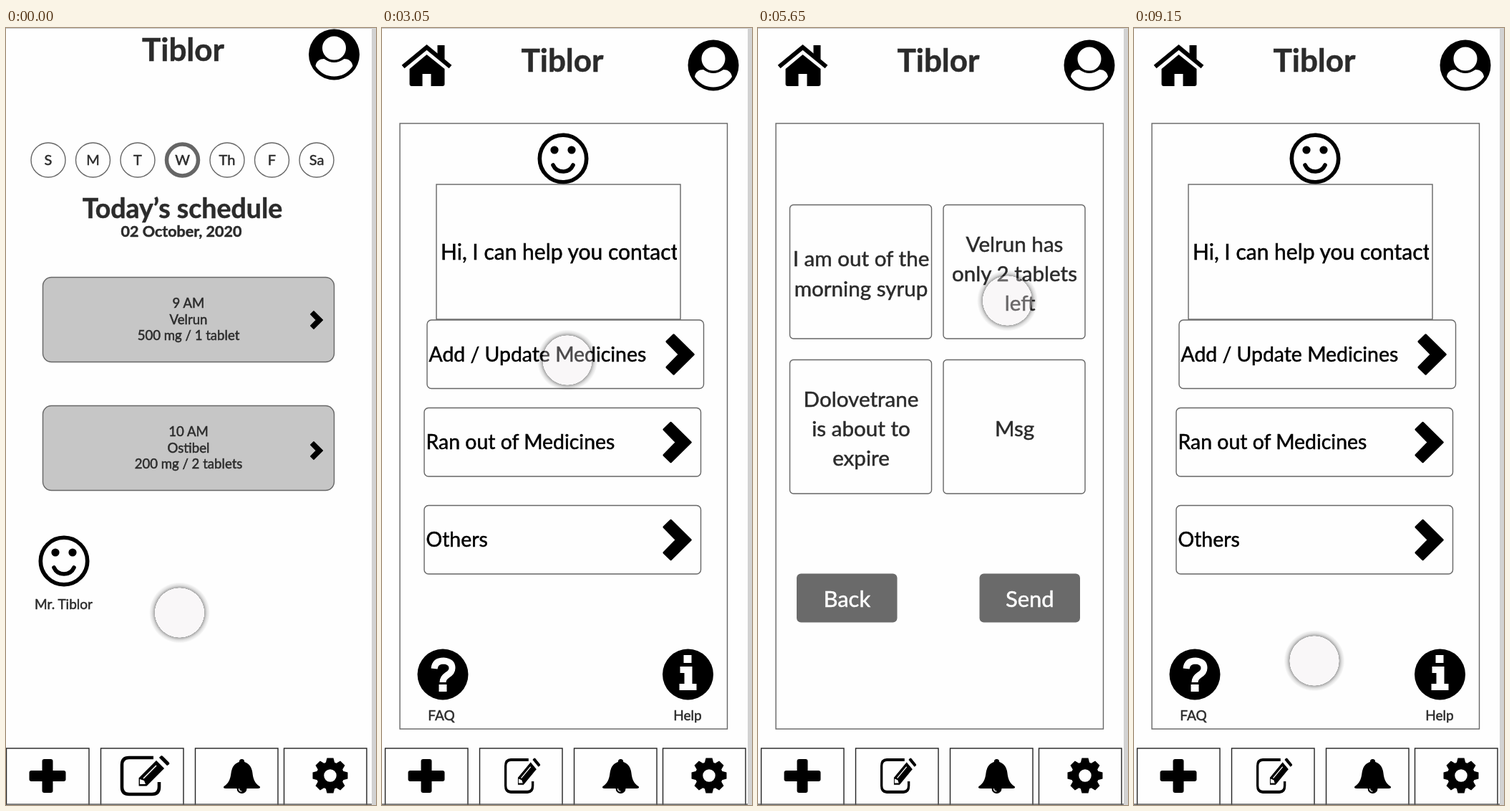
An HTML page that plays this animation: 517x1083 px, repeating every 10000 ms.

```html
<!DOCTYPE html>
<html lang="en">
<head>
<meta charset="utf-8">
<title>Medicine reminder walkthrough</title>
<style>
html, body { margin: 0; width: 100%; height: 100%; overflow: hidden; background: #fefefe; }
svg { display: block; width: 100vw; height: 100vh; }
text { font-family: Lato, "Open Sans", sans-serif; color: #2b2b2b; fill: currentColor; stroke: currentColor; stroke-width: .5; white-space: pre; }
.line { fill: none; stroke: #666; stroke-width: 1.4; }
.ink { fill: none; stroke: #000; }
.paper { fill: #fefefe; }
</style>
</head>
<body>
<svg id="stage" viewBox="0 0 517 1083"></svg>
<script>
const stage = document.getElementById('stage');

const at = (x, y, body, scale = 1) => `<g transform="translate(${x} ${y}) scale(${scale})">${body}</g>`;
const text = (x, y, size, value, attrs = '') =>
  `<text x="${x}" y="${y}" font-size="${size}" text-anchor="middle" ${attrs}>${value}</text>`;
const left = (x, y, size, value, attrs = '') =>
  `<text x="${x}" y="${y}" font-size="${size}" style="color:#000" ${attrs}>${value}</text>`;
const lines = (x, y, step, size, values) => values.map((v, i) => text(x, y + i * step, size, v)).join('');
const box = (x, y, w, h, r = 0, attrs = '') =>
  `<rect class="line" x="${x}" y="${y}" width="${w}" height="${h}" rx="${r}" ${attrs}/>`;
const bold = 'font-weight="700"';

// Icons, each centred on its own origin
const plus = '<rect x="-25.5" y="-7" width="51" height="15" rx="3"/><rect x="-7.5" y="-23" width="15" height="47" rx="3"/>';
const edit = `<path class="ink" stroke-width="4.6" d="M12-25H-22Q-32-25-32-15V16Q-32 26-22 26H10Q20 26 20 16V9"/>
  <path d="M-9 3L16-22 28-10 3 15H-9ZM19-25L22-28Q24-29 26-27L34-19Q36-17 34-15L31-13Z" stroke="#fefefe" stroke-width="1.2"/>
  <path d="M-7 5V12H1L-1 7Z" class="paper"/><path d="M-2 4L16-14" stroke="#fefefe" stroke-width="1.6"/>`;
const bell = `<path d="M-25 15C-14 8-16-3-14-8C-12-16-6-19 0-20C6-19 12-16 14-8C16-3 14 8 25 15Q27 18 22 18H-22Q-27 18-25 15Z"/>
  <circle cy="-19.5" r="3.6"/><circle cy="18" r="7"/><path d="M-4 18Q-4 22 0 22" fill="none" stroke="#fefefe" stroke-width="1.2"/>`;
const tooth = a => `<path d="M-6.5-17L-4.5-24.5H4.5L6.5-17Z" transform="rotate(${a})"/>`;
const gear = '<circle r="14" fill="none" stroke="#000" stroke-width="10.5"/>' +
  [0, 45, 90, 135, 180, 225, 270, 315].map(tooth).join('');
const house = `<path class="ink" stroke-width="6" d="M-33 2L0-25 33 2"/>
  <path d="M15-28H25V-6L15-14ZM-24 5L0-15 25 5V26Q25 29 22 29H6V12H-6V29H-21Q-24 29-24 26Z"/>`;
const profile = `<circle r="35.5"/><path class="paper" d="M-26 16C-25 9-20 6-14 6Q0 16 14 6C20 6 25 9 26 16A30.5 30.5 0 0 1-26 16Z"/>
  <circle class="paper" cy="-9" r="17.5" stroke="#000" stroke-width="2"/>`;
const smiley = `<circle class="ink" r="32.7" stroke-width="5.6"/><circle cx="-12" cy="-12" r="5.6"/><circle cx="12" cy="-12" r="5.6"/>
  <path class="ink" stroke-width="5.6" stroke-linecap="round" d="M-14 9Q-10 18 0 18T14 9"/>`;
const chevron = '<path d="M-8.3-8L-4-12.2 8.4 0-4 12.2-8.3 8-.5 0Z" stroke="#000" stroke-width="1.4" stroke-linejoin="round"/>';
const question = `<circle r="35.5"/><path fill="none" stroke="#fefefe" stroke-width="9" d="M-12-8Q-11-19 1-19Q13-18 13-9Q13-3 6 1Q0 5 0 11"/>
  <rect class="paper" x="-5.5" y="14" width="11" height="10"/>`;
const info = `<circle r="35.5"/><rect class="paper" x="-6" y="-27" width="11" height="11"/>
  <path class="paper" d="M-11-11H6V13H12V22H-12V13H-5V-2H-11Z"/>`;

const nav = (dx, editX, editScale) =>
  [0.5, 132.5, 264.5, 388.5].map(x => box(x + dx, 1004, 115.5, 82, 0, 'style="stroke:#222"')).join('') +
  at(58 + dx, 1042, plus) + at(editX, 1042, edit, editScale) +
  at(329.5 + dx, 1042, bell) + at(453 + dx, 1042, gear);
const header = (x, y) => text(x, y, 44, 'Tiblor', bold) + at(x + 211, y - 9, profile);
const inner = (houseY, body) => header(252, 61) + at(62.5, houseY, house) +
  box(25, 133, 457.5, 844) + body + nav(4, 196, '.73 .88');
const button = (x, y, label) =>
  `<rect x="${x}" y="${y}" width="140.5" height="68" rx="6" fill="#6a6a6a"/>` +
  text(x + 70.3, y + 46.5, 31, label, 'style="color:#fff"');

const day = (name, i) => {
  const x = 59 + i * 62.5, today = i === 3;
  return `<circle class="line" cx="${x}" cy="184" r="${today ? 22 : 24}" ${today ? 'style="stroke-width:5.5"' : ''}/>` +
    text(x, 191, 20, name);
};
const dose = (y, rows) => box(51.5, y, 407, 118, 12, 'style="fill:#c6c6c6"') + lines(255, y + 42.5, 22.6, 18.6, rows);
const option = (x, y, label) => box(x, y, 386.5, 95.5, 6) + left(x + 2.5, y + 57.7, 28.4, label) +
  at(x + 353.5, y + 48, chevron, 2.23);
const message = (x, y, rows, id = '') => box(x, y, 198, 186.5, 5, id) +
  lines(x + 99.5, y + 106.5 - (rows.length - 1) * 20.7, 41.3, 29.6, rows);

const screens = {
  home: header(247.5, 46) + ['S', 'M', 'T', 'W', 'Th', 'F', 'Sa'].map(day).join('') +
    text(246.5, 265, 37.5, 'Today’s schedule', bold) + text(245, 291, 21.5, '02 October, 2020', bold) +
    dose(347.5, ['9 AM', 'Velrun', '500 mg / 1 tablet']) + at(434, 407, chevron) +
    dose(526.5, ['10 AM', 'Ostibel', '200 mg / 2 tablets']) + at(434, 589, chevron) +
    at(81, 743, smiley) + text(80.5, 810, 19, 'Mr. Tiblor') + nav(0, 194, 1),
  chat: inner(52, at(253, 182, smiley) + box(76, 218, 341, 188) +
    left(82, 323, 30, 'Hi, I can help you contact', 'clip-path="url(#field)"') +
    option(63, 407, 'Add / Update Medicines') + option(59, 529.5, 'Ran out of Medicines') + option(59, 665.5, 'Others') +
    at(85, 901, question) + text(83, 965, 19, 'FAQ') + at(427.5, 901, info) + text(427, 965, 19, 'Help')),
  messages: inner(52, message(44.5, 246.5, ['I am out of the', 'morning syrup']) +
    message(259, 246.5, ['Velrun has', 'only 2 tablets', '  left'], 'id="choice"') +
    message(44.5, 462.5, ['Dolovetrane', 'is about to', 'expire']) + message(259, 462.5, ['Msg']) +
    button(54, 760.5, 'Back') + button(309.5, 760.5, 'Send')),
  sent: inner(45, box(90, 180, 340, 341, 6) + box(145.5, 218, 247.5, 121.5) + left(152, 288, 31, 'Message Sent !') +
    `<path class="ink" stroke-width="9" d="M299 391H232Q216 391 216 407V461Q216 477.5 233 477.5H287Q304 477.5 304 461V436"/>
     <path d="M229 429L242 416 264 438 314 391 327 405 265 465Z" stroke="#fefefe" stroke-width="7" paint-order="stroke" stroke-linejoin="round"/>` +
    button(170.5, 861.5, 'Back'))
};

stage.innerHTML = `<defs>
  <clipPath id="field"><rect x="76" y="218" width="336" height="188"/></clipPath>
  <radialGradient id="shade"><stop offset=".81" stop-color="#000" stop-opacity="0"/><stop offset=".815" stop-color="#000" stop-opacity=".34"/>
  <stop offset=".9" stop-color="#000" stop-opacity=".12"/><stop offset="1" stop-color="#000" stop-opacity="0"/></radialGradient></defs>
  <rect class="paper" width="517" height="1083"/>` +
  Object.entries(screens).map(([name, body]) => `<g id="${name}">${body}</g>`).join('') +
  `<path d="M0 .5H517" stroke="#c4c4c4"/><rect x="511" width="6" height="1083" fill="#d2d2d2"/>
  <path d="M0 1082H511" stroke="#555" stroke-width="1.4"/>
  <g id="pointer"><circle r="42.5" fill="url(#shade)"/><circle r="34.5" fill="#ebe5e8" fill-opacity=".32"/></g>`;

const schedule = [[0, 'home'], [2450, ''], [2600, 'chat'], [4300, ''], [4500, 'messages'],
  [7300, ''], [7400, 'sent'], [9050, ''], [9150, 'chat']];
// start, end, bend point, destination
const moves = [
  [1735, 2200, 168, 790, 94, 764],
  [2860, 3050, 176, 613, 259, 463],
  [3370, 3800, 245, 511, 230.5, 559],
  [5020, 5650, 195, 480, 348.5, 380],
  [6570, 7050, 400, 590, 366, 804],
  [7795, 8050, 412, 815, 267, 858],
  [8320, 8550, 258, 870, 252, 882]
];
const ease = p => p * p * (3 - 2 * p);

function pointerAt(t) {
  let x = 242.5, y = 815;
  for (const [start, end, bx, by, ex, ey] of moves) {
    if (t <= start) break;
    const p = ease(Math.min(1, (t - start) / (end - start))), q = 1 - p;
    x = q * q * x + 2 * p * q * bx + p * p * ex;
    y = q * q * y + 2 * p * q * by + p * p * ey;
  }
  return [x, y];
}

const groups = Object.keys(screens).map(id => document.getElementById(id));
const choice = document.getElementById('choice');
const pointer = document.getElementById('pointer');

function draw(t) {
  const current = schedule.filter(([start]) => start <= t).pop()[1];
  for (const g of groups) g.style.display = g.id === current ? '' : 'none';
  choice.style.fill = t >= 5900 ? '#c6c6c6' : 'none';
  pointer.setAttribute('transform', `translate(${pointerAt(t).join(' ')})`);
}

const began = performance.now();
function tick() {
  draw((performance.now() - began) % 10000);
  requestAnimationFrame(tick);
}
tick();
</script>
</body>
</html>
```
